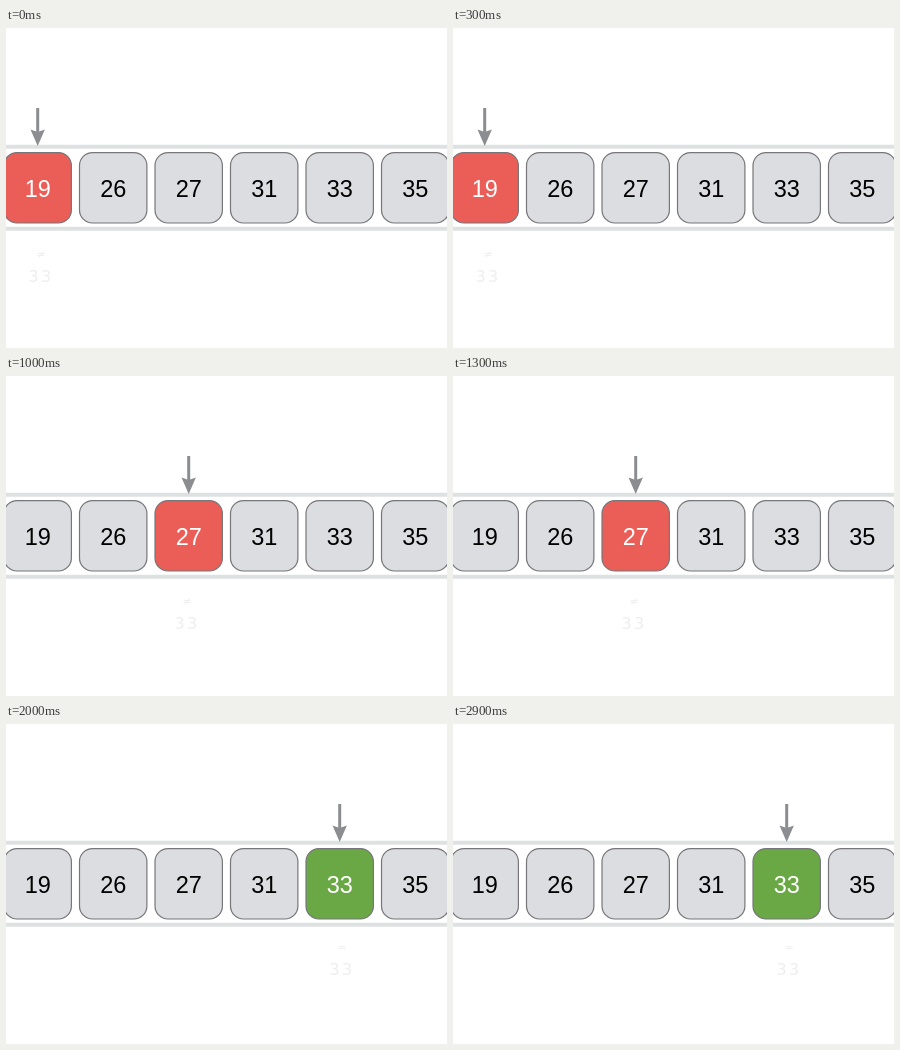
Recreate the animation shown at these times as an HTML page. Size 441x320 px, loop 3.5 s.

```html
<!DOCTYPE html>
<html lang="en">
<head>
<meta charset="utf-8">
<title>Linear search</title>
<style>
  html, body { margin: 0; width: 100%; height: 100%; overflow: hidden; background: #fff; }
  svg { display: block; width: 441px; height: 320px; }
  text { text-anchor: middle; font: 23.5px "Liberation Sans", Arial, sans-serif; }
  .cell rect { fill: #dcdde0; stroke: #77767a; stroke-width: 1.2; }
  .miss rect { fill: #eb5e57; }
  .hit rect { fill: #6aa745; }
  .miss text, .hit text { fill: #fff; }
  #note text { font: 16px "DejaVu Sans", sans-serif; fill: #eeeeee; }
</style>
</head>
<body>
<svg viewBox="0 0 441 320">
  <path d="M0 118.7H441M0 200.7H441" stroke="#dee1e2" stroke-width="4"/>
  <g id="cells"></g>
  <g id="arrow" fill="#8c8d91">
    <rect x="-1.5" y="80" width="3" height="24"/>
    <path d="M-7.2 101.5L0 104L7.2 101.5L0 118Z"/>
  </g>
  <g id="note">
    <text id="sign" style="font-size:11px"></text>
    <text y="24" letter-spacing="2.4">33</text>
  </g>
</svg>
<script>
const values = [19, 26, 27, 31, 33, 35];
const step = 500, loop = 3500, found = 4;
const notes = [[35, 230], [108, 230], [181, 229], [260, 227], [336, 227]];
const $ = id => document.getElementById(id);
const centre = i => 31.7 + 75.5 * i;

$("cells").innerHTML = values.map((v, i) =>
  `<g class="cell" transform="translate(${centre(i)} 0)">
    <rect x="-33.7" y="124.6" width="67.4" height="70.4" rx="13"/>
    <text y="168.5">${v}</text>
  </g>`).join("");
const cells = [...$("cells").children];

let shown = -1;
function draw(now) {
  const at = Math.min(found, Math.floor(now % loop / step));
  if (at !== shown) {
    shown = at;
    cells.forEach((cell, i) => {
      cell.setAttribute("class", "cell" + (i !== at ? "" : at === found ? " hit" : " miss"));
    });
    $("arrow").setAttribute("transform", `translate(${centre(at)} 0)`);
    $("note").setAttribute("transform", `translate(${notes[at]})`);
    $("sign").textContent = at === found ? "=" : "≠";
  }
  requestAnimationFrame(() => draw(performance.now()));
}
draw(performance.now());
</script>
</body>
</html>
```
